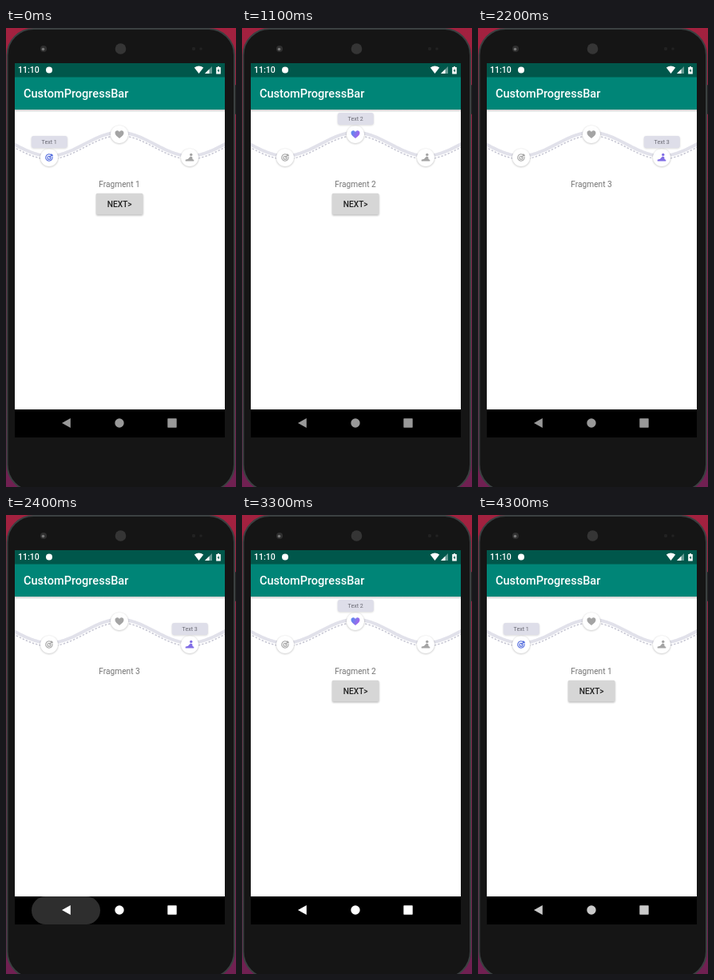
An HTML page that plays this animation: 288 px wide and 574 px high, repeating every 4.4 s.

```html
<!DOCTYPE html>
<html lang="en">
<head>
<meta charset="utf-8">
<title>CustomProgressBar</title>
<style>
  html, body { margin: 0; width: 100%; height: 100%; overflow: hidden; }
  svg { display: block; width: 100vw; height: 100vh; }
  text { font-family: Roboto, sans-serif; }
  .mid { text-anchor: middle; }
  .strong { font-weight: 500; }
</style>
</head>
<body>
<svg viewBox="0 0 288 574">
  <defs>
    <linearGradient id="desk" x1="0" y1="0" x2="0" y2="1">
      <stop offset="0" stop-color="#a3213f"/>
      <stop offset=".5" stop-color="#82264a"/>
      <stop offset="1" stop-color="#702052"/>
    </linearGradient>
    <linearGradient id="accent" x1="0" y1="0" x2="1" y2="0.4">
      <stop offset="0" stop-color="#538cf0"/>
      <stop offset="1" stop-color="#a565ea"/>
    </linearGradient>
    <linearGradient id="barShadow" x1="0" y1="0" x2="0" y2="1">
      <stop offset="0" stop-color="#000" stop-opacity=".24"/>
      <stop offset="1" stop-color="#000" stop-opacity="0"/>
    </linearGradient>
    <pattern id="mesh" width="2" height="2" patternUnits="userSpaceOnUse">
      <rect width="2" height="2" fill="#222"/>
      <circle cx="1" cy="1" r=".7" fill="#555"/>
    </pattern>
    <filter id="soft" x="-50%" y="-50%" width="200%" height="200%">
      <feGaussianBlur stdDeviation="1.1"/>
    </filter>
    <clipPath id="screen"><rect x="11" y="44" width="263" height="468"/></clipPath>
  </defs>

  <rect width="288" height="574" fill="url(#desk)"/>
  <rect x="284" y="71" width="4" height="37" rx="1" fill="#242424"/>
  <rect x="1.5" y="1" width="284.5" height="578" rx="33" fill="#151515" stroke="#3b4041" stroke-width="2"/>
  <circle cx="47" cy="26" r="4" fill="#303030"/>
  <circle cx="46.5" cy="26.5" r="1.8" fill="#777"/>
  <circle cx="143.5" cy="26" r="6.8" fill="url(#mesh)"/>
  <circle cx="235" cy="26" r="2.2" fill="#222"/>
  <circle cx="244" cy="26" r="1.8" fill="#222"/>

  <g clip-path="url(#screen)">
    <rect x="11" y="44" width="263" height="468" fill="#fff"/>
    <rect x="11" y="101.5" width="263" height="4" fill="url(#barShadow)"/>
    <rect x="11" y="44" width="263" height="18" fill="#00574b"/>
    <rect x="11" y="61.5" width="263" height="40.5" fill="#008577"/>
    <g fill="#fff">
      <text class="strong" x="15" y="56.3" font-size="10.6">11:10</text>
      <circle cx="54" cy="52.5" r="4"/>
      <path d="M235.8 49.6Q241.5 45.6 247.2 49.6L241.5 57Z"/>
      <path d="M258 48V57H249Z" opacity=".4"/>
      <path d="M254.5 51.5V57H249Z"/>
      <path d="M263.2 49H265V48H267V49H268.8V57.5H263.2Z"/>
      <path d="M266.5 50.5L264.6 53.7H265.8V56L267.5 52.8H266.4Z" fill="#00574b"/>
      <text class="strong" x="22" y="87" font-size="14.55">CustomProgressBar</text>
    </g>

    <path id="road" fill="none" stroke="#e1e1ea" stroke-width="4"/>
    <path id="dots" fill="none" stroke="#c5c5d2" stroke-width="1.5" stroke-dasharray="2.4 2"/>
    <g id="nodes"></g>

    <text id="label" class="mid" x="142" y="199.2" font-size="10.2" fill="#757575"></text>
    <g id="button">
      <rect id="buttonShadow" x="113" y="208" width="58.5" height="26.5" rx="1.5" filter="url(#soft)"/>
      <rect id="buttonFace" x="112.8" y="206.8" width="58.6" height="26.5" rx="1.5"/>
      <text class="mid strong" x="142.2" y="223.6" font-size="10.2" fill="#222">NEXT&gt;</text>
    </g>

    <rect x="11" y="477" width="263" height="35" fill="#000"/>
    <rect id="ripple" x="32" y="477" width="86" height="35" rx="17.5" fill="#fff" opacity=".18"/>
    <g id="nav">
      <path d="M70 494L80.8 488V500Z"/>
      <circle cx="142" cy="494" r="5.7"/>
      <rect x="202.3" y="488.3" width="11.4" height="11.4" rx=".6"/>
    </g>
  </g>
</svg>
<script>
const LOOP = 4400;
const GREY = '#a4a4a4';
const $ = id => document.getElementById(id);

// Each track is a list of [time in ms, value]; a value holds until the next one.
const tracks = {
  selected: [[0, 0], [700, 1], [1700, 2], [2500, 1], [3500, 0]],
  node: [[0, 1], [700, 0], [800, .6], [900, 1], [1700, 0], [1800, .6], [1900, 1],
         [2500, 0], [2900, .55], [3100, 1], [3500, 0], [3800, 1]],
  tip: [[0, 1], [700, 0], [900, .55], [1100, 1], [1700, 0], [1900, .55], [2100, 1],
        [2500, 0], [2900, 1], [3500, 0], [3800, 1]],
  fragment: [[0, 1], [1100, 2], [2100, 3], [2700, 2], [3500, 1]],
  pressed: [[0, 0], [500, 1], [900, 0], [1500, 1], [1900, 0]],
  ripple: [[0, 0], [2300, 1], [2500, 0], [3400, 1], [3500, 0]],
  nav: [[0, '#999'], [2300, '#fff'], [4200, '#e4e4e4'], [4300, '#cacaca']]
};
const at = (name, t) => tracks[name].findLast(([start]) => start <= t)[1];

function wave(offset) {
  let d = '';
  for (let x = 9; x <= 276; x += 2) {
    const y = 145.3 - 14.6 * Math.cos((x - 142) * Math.PI / 88) + offset;
    d += (d ? 'L' : 'M') + x + ' ' + y.toFixed(2);
  }
  return d;
}
$('road').setAttribute('d', wave(0));
$('dots').setAttribute('d', wave(4));

const icons = [
  `<g fill="none" stroke="currentColor" stroke-width="1.1">
     <path d="M2.2 -3.5A4.2 4.2 0 1 0 4 -1"/><circle cy=".2" r="2"/>
     <path d="M0 .2L4.2 -4M2.6 -4.5V-2.4H4.8"/></g>`,
  `<path fill="currentColor" d="M0 5C-3 2.6 -5.5 .6 -5.5 -1.8C-5.5 -5.3 -1.4 -5.9 0 -3.1
     C1.4 -5.9 5.5 -5.3 5.5 -1.8C5.5 .6 3 2.6 0 5Z"/>`,
  `<g fill="currentColor"><circle cx="1.8" cy="-3.6" r="1.7"/>
     <path d="M-5.3 4.5V2.7L-2 1.8L1 -1.6L3.2 -.8L3.6 2L5.3 3V4.5Z"/></g>`
];
const centers = [[54, 162], [142, 133], [230, 162]];
const accents = ['#526bdd', 'url(#accent)', '#806de5'];

$('nodes').innerHTML = centers.map(([x, y], i) => `
  <g transform="translate(${x} ${y})">
    <g class="node">
      <circle cy=".7" r="11.2" fill="#000" opacity=".22" filter="url(#soft)"/>
      <circle r="11" fill="#fff"/>
      <g class="icon">${icons[i]}</g>
    </g>
    <g class="tip">
      <rect x="-22.2" y="-6.8" width="45" height="15" rx="3" fill="#000" opacity=".16" filter="url(#soft)"/>
      <rect x="-22.2" y="-7.5" width="45" height="15" rx="3" fill="#dedee9"/>
      <text class="mid" x=".2" y="2.5" font-size="7.1" fill="#696973">Text ${i + 1}</text>
    </g>
  </g>`).join('');

const nodes = [...$('nodes').children].map(group => ({
  body: group.querySelector('.node'),
  tip: group.querySelector('.tip'),
  shapes: group.querySelectorAll('.icon [fill="currentColor"], .icon [stroke="currentColor"]')
}));
nodes.forEach(node => {
  node.paints = [...node.shapes].map(el =>
    [el, el.getAttribute('fill') === 'currentColor' ? 'fill' : 'stroke']);
});

const show = (el, visible) => el.setAttribute('display', visible ? 'inline' : 'none');

function scale(el, size, y = 0) {
  show(el, size > 0);
  el.setAttribute('transform', `translate(0 ${y}) scale(${size})`);
}

function render(t) {
  const selected = at('selected', t);
  nodes.forEach((node, i) => {
    const active = i === selected;
    scale(node.body, active ? at('node', t) : 1);
    scale(node.tip, active ? at('tip', t) : 0, -19.5);
    node.paints.forEach(([el, kind]) => el.setAttribute(kind, active ? accents[i] : GREY));
  });

  const fragment = at('fragment', t);
  const pressed = at('pressed', t);
  $('label').textContent = 'Fragment ' + fragment;
  show($('button'), fragment < 3);
  $('buttonFace').setAttribute('fill', pressed ? '#bfbfbf' : '#d6d6d6');
  $('buttonShadow').setAttribute('opacity', pressed ? .5 : .28);
  show($('ripple'), at('ripple', t));
  $('nav').setAttribute('fill', at('nav', t));
}

const start = performance.now();
function tick() {
  render((performance.now() - start) % LOOP);
  requestAnimationFrame(tick);
}
tick();
</script>
</body>
</html>
```
